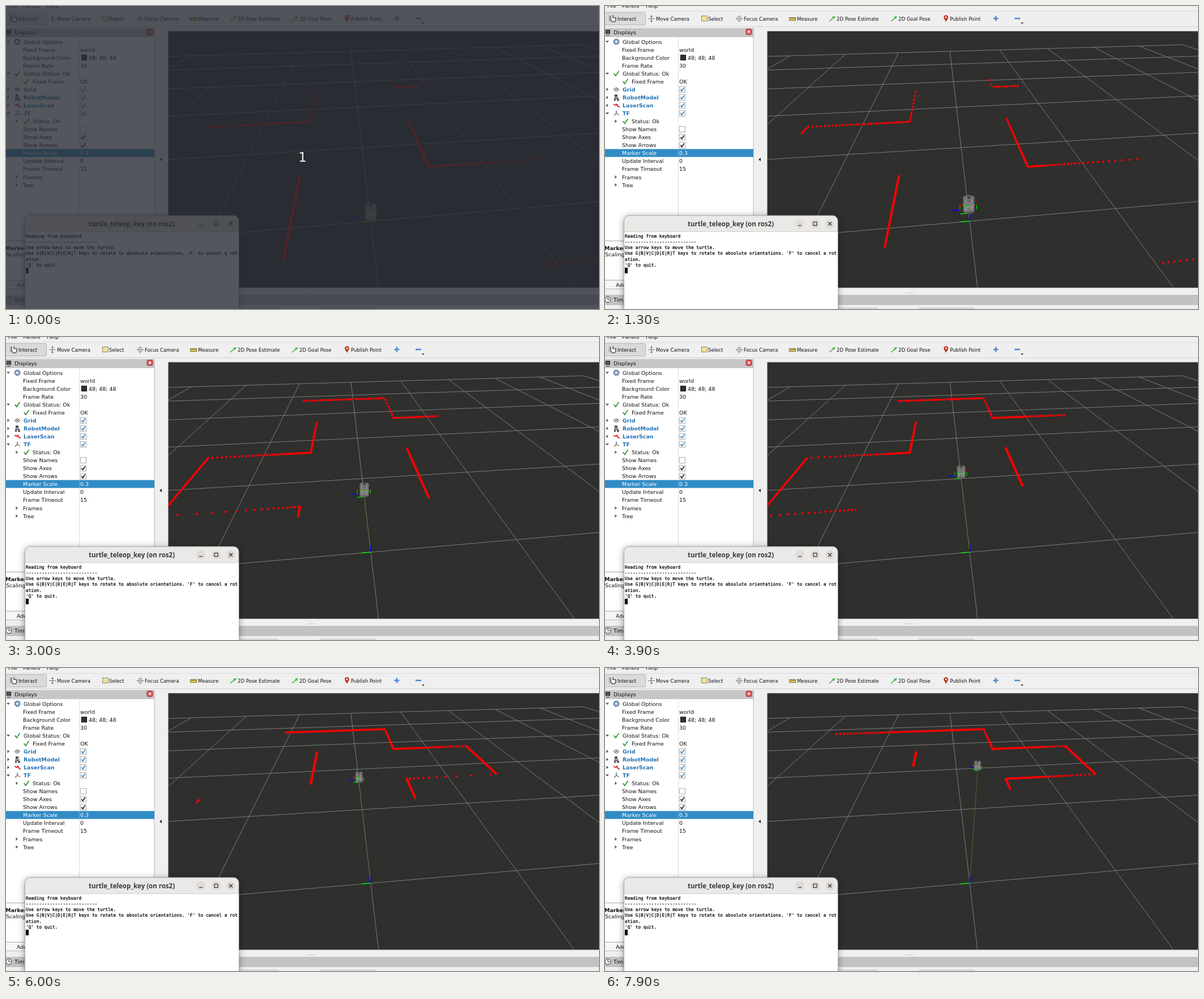
An HTML page with a canvas for the animation above (8000 ms loop, 1047x535 px).

```html
<!DOCTYPE html>
<html lang="en">
<head>
<meta charset="utf-8">
<title>Laser scan of a driving robot</title>
<style>
  html, body { margin: 0; width: 100%; height: 100%; overflow: hidden; background: #efefef; }
  canvas, svg, #dim { position: absolute; left: 0; top: 0; width: 1047px; height: 535px; }
  svg { font: 9.45px "DejaVu Sans", sans-serif; fill: #111; }
  .window { filter: drop-shadow(0 2px 6px rgba(0, 0, 0, .4)); }
  #dim { background: rgba(40, 44, 52, .8); color: #f2f2f2; text-align: center;
         font: 23px/535px "DejaVu Sans", sans-serif; }
</style>
</head>
<body>
<canvas id="scene" width="1047" height="535"></canvas>
<svg id="ui" viewBox="0 0 1047 535"></svg>
<div id="dim">1</div>
<script>
// ---------- static interface ----------
const rect = (x, y, w, h, fill, more = '') =>
  `<rect x="${x}" y="${y}" width="${w}" height="${h}" fill="${fill}" ${more}/>`;
const path = (d, stroke, width = 1, fill = 'none') =>
  `<path d="${d}" stroke="${stroke}" stroke-width="${width}" fill="${fill}"/>`;
const text = (x, y, s, more = '') => `<text x="${x}" y="${y}" xml:space="preserve" ${more}>${s}</text>`;
const tick = (x, y, color, size = 1) =>
  path(`M${x - 4 * size} ${y}l${3 * size} ${3.5 * size}l${5 * size} ${-7.5 * size}`, color, 1.6);

function toolbar() {
  const labels = [[22, 'Interact'], [90, 'Move Camera'], [182, 'Select'], [245, 'Focus Camera'],
    [339, 'Measure'], [409, '2D Pose Estimate'], [518, '2D Goal Pose'], [609, 'Publish Point']];
  const arrow = x => path(`M${x} 27l7 -6`, '#3fae3f', 1.6) + path(`M${x + 5} 19l6 -1l-3 5z`, 'none', 0, '#2fc02f');
  return text(4, 3, 'File') + text(30, 3, 'Panels') + text(72, 3, 'Help') +
    path('M0 9.5H1047', '#dcdcdc') + path('M0 36.5H1047', '#d2d2d2') +
    rect(-3.5, 11.5, 75, 22, '#dadada', 'rx="2" stroke="#b4b4b4"') +
    path('M10 17v8l3 3h4l2 -3v-4l-5 -1v-4', '#222', 1.2, '#f4f4f4') + path('M7.5 17v10', '#888') +
    path('M76 22.5h12M82 17v11', '#777', 1.2) + path('M80 19l2 -3l2 3zM80 26l2 3l2 -3z', 'none', 0, '#3a78b0') +
    rect(170.5, 17.5, 10, 9, '#f1e29a', 'stroke="#555" stroke-dasharray="2 1"') +
    '<circle cx="237" cy="22.5" r="4" fill="none" stroke="#8a8a8a"/>' +
    path('M230.5 22.5h13M237 16v13', '#8a8a8a') +
    rect(325.5, 20.5, 11, 5, '#e9c85a', 'stroke="#7c6a2c"') + path('M328.5 21v2M331.5 21v2M334.5 21v2', '#5c4d18') +
    arrow(396) + arrow(505) +
    path('M602 28l-3.5 -6a4 4 0 1 1 7 0z', 'none', 0, '#c23a22') + '<circle cx="602" cy="20" r="1.4" fill="#fff"/>' +
    path('M685.5 22h9M690 17.5v9', '#4a8ad4', 2.6) + path('M723 22h10', '#4a8ad4', 2.6) +
    path('M734 29h5l-2.5 3z', 'none', 0, '#444') +
    labels.map(([x, s]) => text(x, 25.5, s, 'font-size="8.5"')).join('');
}

function displaysPanel() {
  // [indent, name, value, expander, icon]; value true/false is a checkbox
  const rows = [
    [31, 'Global Options', '', 'v', 'gear'], [30, 'Fixed Frame', 'world'],
    [30, 'Background Color', '48; 48; 48'], [30, 'Frame Rate', '30'],
    [31, 'Global Status: Ok', '', 'v', 'ok'], [47, 'Fixed Frame', 'OK', '', 'ok'],
    [31, 'Grid', true, '>', 'grid'], [31, 'RobotModel', true, '>', 'robot'],
    [31, 'LaserScan', true, '>', 'scan'], [31, 'TF', true, 'v', 'axes'],
    [47, 'Status: Ok', '', '>', 'ok'], [30, 'Show Names', false], [30, 'Show Axes', true],
    [30, 'Show Arrows', true], [30, 'Marker Scale', '0.3'], [30, 'Update Interval', '0'],
    [30, 'Frame Timeout', '15'], [30, 'Frames', '', '>'], [30, 'Tree', '', '>']];
  const icons = {
    gear: (x, y) => `<circle cx="${x}" cy="${y}" r="3.5" fill="none" stroke="#7f97ba" stroke-width="2.8"/>` +
      `<circle cx="${x}" cy="${y}" r="5" fill="none" stroke="#5d7ba6" stroke-width="1.5" stroke-dasharray="2 1.93"/>`,
    ok: (x, y) => tick(x, y, '#1c8a1c', 1.1),
    grid: (x, y) => path(`M${x - 5} ${y}l5 -3.5l5 3.5l-5 3.5zM${x - 2.5} ${y - 2}l5 3.5M${x + 2.5} ${y - 2}l-5 3.5`, '#555'),
    robot: (x, y) => rect(x - 3, y - 5, 5, 4, '#444') + rect(x - 4, y, 8, 3, '#667') +
      path(`M${x - 4} ${y + 4.5}h3M${x + 1} ${y + 4.5}h4`, '#222', 2),
    scan: (x, y) => path(`M${x - 5} ${y - 2}l4 2l2 -2l2 4l3 1`, '#d81818', 1.8),
    axes: (x, y) => path(`M${x} ${y}v-5`, '#3050d0', 1.3) + path(`M${x} ${y}l-4 4`, '#d03030', 1.3) +
      path(`M${x} ${y}l5 3`, '#30a030', 1.3)
  };
  let out = rect(0, 39, 262, 16, '#c6c6c6') + rect(1.5, 42.5, 7, 6, '#555', 'stroke="#222"') +
    path('M2 51.5h6', '#222') + text(15, 50, 'Displays') +
    rect(249, 40.5, 10, 10, '#d9534f', 'rx="2.5" stroke="#a33"') + path('M252 43.5l4 4m0 -4l-4 4', '#fff', 1.3) +
    rect(0, 55, 262, 359, '#fff') + path('M262 39V414.5H0', '#b8b8b8') + path('M129.5 55V414', '#dcdcdc');
  rows.forEach(([x, name, value, expander, icon], i) => {
    const y = 63 + 14.06 * i, selected = name === 'Marker Scale';
    const bold = icon && value === true;
    const color = selected ? '#fff' : bold ? '#2272b4' : '#111';
    if (selected) out += rect(0, y - 7.3, 262, 14, '#308cc6') + path(`M129.5 ${y - 7.3}v14`, '#6fb0d8');
    const ex = x === 31 ? 4 : 19;
    if (expander === 'v') out += path(`M${ex - 3} ${y - 1.5}h6l-3 3.5z`, 'none', 0, '#555');
    if (expander === '>') out += path(`M${ex - 1.5} ${y - 3}v6l3.5 -3z`, 'none', 0, '#555');
    if (icon) out += icons[icon](x - 11, y);
    out += text(x, y + 3.5, name, `fill="${color}" ${bold ? 'font-weight="bold"' : ''}`);
    if (typeof value === 'boolean') {
      out += rect(131.5, y - 5, 10, 10, '#fff', 'stroke="#aaa"');
      if (value) out += tick(136.5, y, bold ? '#2f7cba' : '#111', .8);
    } else {
      const swatch = name === 'Background Color';
      if (swatch) out += rect(133.5, y - 4.5, 9, 9, '#303030', 'stroke="#111"');
      out += text(swatch ? 146 : 131, y + 3.5, value, `fill="${color}"`);
    }
  });
  return out + path('M275 268v6l-4 -3z', 'none', 0, '#222') +
    rect(0, 417, 40, 65, '#fff') + text(-1, 431, 'Marker Scale', 'font-weight="bold"') +
    text(0, 442, 'Scaling') + rect(-4.5, 484.5, 60, 15, '#f6f6f6', 'rx="2" stroke="#bbb"') + text(19, 496, 'Add');
}

function timePanel() {
  return path('M531 506.5h14', '#c8c8c8') + rect(0, 510, 1047, 18, '#c2c2c2') +
    '<circle cx="5" cy="518.5" r="5" fill="#eee" stroke="#333"/>' + path('M5 515v3.5h3', '#333') +
    text(15, 522, 'Time') + rect(380.5, 533.5, 101, 9, '#fff', 'rx="2" stroke="#aaa"') +
    rect(554.5, 533.5, 98, 9, '#fff', 'rx="2" stroke="#aaa"');
}

function terminal() {
  const lines = ['Reading from keyboard', '-'.repeat(27), 'Use arrow keys to move the turtle.',
    "Use G|B|V|C|D|E|R|T keys to rotate to absolute orientations. 'F' to cancel a rot", 'ation.', "'Q' to quit."];
  const mono = 'font-size="7.78" font-family="DejaVu Sans Mono, monospace" fill="#000" stroke="#000" stroke-width=".25"';
  return '<g class="window">' +
    path('M33.5 560V379a9 9 0 0 1 9 -9H402a9 9 0 0 1 9 9V560z', '#a8a5a2', 1, '#ebe9e7') + '</g>' +
    rect(34, 399, 377, 136, '#fff') + path('M34 398.5H411', '#d2cfcc') +
    text(222, 389, 'turtle_teleop_key (on ros2)',
      'text-anchor="middle" font-size="11.5" font-weight="bold" fill="#3b3b3b" font-family="Noto Sans, sans-serif"') +
    [344, 371, 397].map(x => `<circle cx="${x}" cy="384.5" r="8" fill="#dedbd9"/>`).join('') +
    path('M341 387.5h6', '#333', 1.2) + rect(368, 381.5, 6, 6, 'none', 'stroke="#333" stroke-width="1.2"') +
    path('M394 381.5l6 6m0 -6l-6 6', '#333', 1.2) +
    lines.map((s, i) => text(35, 409 + 10.15 * i, s, mono)).join('') + rect(35, 462, 5, 10, '#000');
}

document.getElementById('ui').innerHTML = toolbar() + displaysPanel() + timePanel() + terminal();

// ---------- 3D view ----------
const ctx = document.getElementById('scene').getContext('2d');
const DEG = Math.PI / 180;
const HALF_FOV = 121.6, RAY_STEP = .8, MAX_RANGE = 2.98;
const VIEW = [286.5, 44.4, 761, 453];

// World metres (x forward, y left) to the screen; z = 1 is the height of the laser.
function project(x, y, z = 0) {
  const k = x * (1 + .045 * z) + .0775 * z, m = y * (1 + .045 * z) - .0075 * z;
  const w = 1 + .4118 * k - .0526 * m;
  return [(644 + 243.8 * k - 304.8 * m) / w, (380 - 27.06 * k + 3.45 * m) / w, w];
}

const walls = [
  [[-.53, .5], [.5, .5], [.5, 1.5], [1.5, 1.5], [1.5, .5], [2.5, .5], [2.5, 2.5]],
  [[-.53, -3], [-.53, -.5]],
  [[.5, -1.5], [.5, -.5], [1.5, -.5], [1.5, -1.5], [2.5, -1.5], [2.5, -.5], [3.5, -.5], [3.5, 2.5]]
].flatMap(line => line.slice(1).map((end, i) => [line[i], end]));

// Distance driven after a start from rest.
function drive(seconds) {
  const speed = .355, ramp = .55, s = Math.max(0, seconds);
  return s < ramp ? speed * s * s / (2 * ramp) : speed * (s - ramp / 2);
}

function robotPose(t) {
  const turn = Math.min(1, Math.max(0, (t - 5.6) / .9));
  const heading = -37.8 * DEG * turn, second = drive(t - 6.5);
  return { x: Math.min(1.61, drive(t - .8)) + second * Math.cos(heading),
           y: second * Math.sin(heading), heading };
}

function stroke(a, b, color, width = 1) {
  ctx.strokeStyle = color;
  ctx.lineWidth = width;
  ctx.beginPath();
  ctx.moveTo(a[0], a[1]);
  ctx.lineTo(b[0], b[1]);
  ctx.stroke();
}

function drawGrid() {
  for (let i = -5; i <= 5; i++) {
    stroke(project(5, i), project(-1, i), '#7c7c79');
    if (i >= -1) stroke(project(i, 5), project(i, -5), '#7c7c79');
  }
}

function castRay({ x, y }, angle) {
  const dx = Math.cos(angle), dy = Math.sin(angle);
  let nearest = Infinity;
  for (const [[ax, ay], [bx, by]] of walls) {
    const ex = bx - ax, ey = by - ay, det = dx * ey - dy * ex;
    const distance = ((ax - x) * ey - (ay - y) * ex) / det;
    const along = ((ax - x) * dy - (ay - y) * dx) / det;
    if (distance > 0 && along >= 0 && along <= 1) nearest = Math.min(nearest, distance);
  }
  return nearest;
}

function drawScan(pose) {
  ctx.fillStyle = '#f00';
  for (let a = -HALF_FOV; a <= HALF_FOV; a += RAY_STEP) {
    const angle = pose.heading + a * DEG, d = castRay(pose, angle);
    if (d > MAX_RANGE) continue;
    const [px, py] = project(pose.x + d * Math.cos(angle), pose.y + d * Math.sin(angle), 1);
    ctx.beginPath();
    ctx.arc(px, py, 2, 0, 7);
    ctx.fill();
  }
}

function drawRobot({ x, y, heading }) {
  const local = (fx, fy, z) => project(
    x + fx * Math.cos(heading) - fy * Math.sin(heading),
    y + fx * Math.sin(heading) + fy * Math.cos(heading), z);
  const [px, py, w] = local(0, 0, 0);
  const disc = (cy, r, fill) => {
    ctx.fillStyle = fill;
    ctx.beginPath();
    ctx.ellipse(0, cy, r, r * .42, 0, 0, 7);
    ctx.fill();
  };
  ctx.save();
  ctx.translate(px, py);
  ctx.scale(1 / w, 1 / w);
  disc(-3, 10, '#5c5c5c');
  ctx.fillStyle = '#777';
  ctx.fillRect(-10, -15, 20, 12);
  disc(-15, 10.5, '#999');
  ctx.fillStyle = '#686868';
  ctx.fillRect(-10.5, -28, 21, 12);
  ctx.fillStyle = '#8e8e8e';
  ctx.fillRect(-7, -26, 3, 22);
  ctx.fillRect(4, -26, 3, 20);
  disc(-16, 9, '#7b7b7b');
  disc(-28, 10.5, '#727272');
  disc(-29, 4, '#4c4c4c');
  ctx.restore();

  const line = (a, b, color) => stroke(local(...a), local(...b), color, 1.5);
  line([0, .01, 0], [0, .058, 0], '#0d0');
  line([0, .06, .5], [0, .115, .5], '#00f');
  line([0, .06, 1.1], [0, .06, .5], '#0a0');
  line([0, .055, 1.3], [0, .055, .8], '#c00');
  line([0, -.05, 1], [0, -.05, .4], '#0c0');
  line([0, -.045, 1.5], [0, -.045, 1], '#900');
  line([0, .04, 1], [0, 0, 1], '#0b0');
  line([0, 0, 2.2], [0, 0, 1.9], '#114');
}

function drawScene(t) {
  const pose = robotPose(t), origin = project(0, 0);
  ctx.clearRect(0, 0, 1047, 535);
  ctx.save();
  ctx.beginPath();
  ctx.rect(...VIEW);
  ctx.clip();
  ctx.fillStyle = '#2f2f2e';
  ctx.fillRect(0, 0, 1047, 535);
  drawGrid();
  stroke(origin, project(pose.x, pose.y), '#5e5e34');
  stroke(origin, [644.5, 367], '#00f', 1.6);
  stroke(origin, [628, 381], '#0e0', 1.6);
  drawScan(pose);
  drawRobot(pose);
  ctx.restore();
}

const dim = document.getElementById('dim');
function frame() {
  const step = Math.floor(performance.now() % 8000 / 100);
  dim.style.display = step === 0 ? 'block' : 'none';
  drawScene(step / 10);
  requestAnimationFrame(frame);
}
frame();
</script>
</body>
</html>
```
